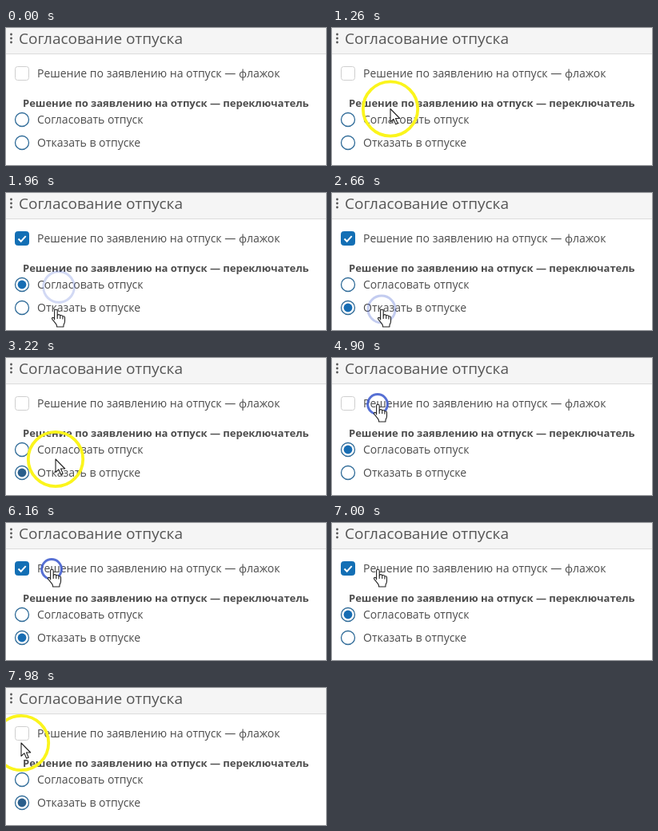
Recreate the animation shown at these times as an HTML page. Size 400x172 px, loop 8000 ms.

```html
<!DOCTYPE html>
<html lang="ru">
<head>
<meta charset="utf-8">
<title>Согласование отпуска</title>
<style>
  html, body { margin: 0; width: 100%; height: 100%; overflow: hidden; background: #fff; }
  svg { display: block; width: 400px; height: 172px; font: 14px "Open Sans", sans-serif; fill: #4c4c4c; }
  .title { font-size: 19px; fill: #555; }
  .group { font-size: 13px; font-weight: 700; }
  .radio { fill: #fff; stroke: #2f6b98; stroke-width: 1.3; }
  .pointer { fill: #fff; stroke: #222; stroke-width: 1.1; stroke-linejoin: round; }
</style>
</head>
<body>
<svg viewBox="0 0 400 172">
  <rect width="400" height="32" fill="#f5f5f5"/>
  <rect y="32" width="400" height="1" fill="#dcdcdc"/>
  <g fill="#555">
    <circle cx="6.5" cy="8" r="1.4"/><circle cx="6.5" cy="13" r="1.4"/><circle cx="6.5" cy="18" r="1.4"/>
  </g>
  <text class="title" x="16" y="20">Согласование отпуска</text>

  <rect id="box" x="11.5" y="48.5" width="17" height="17" rx="3" stroke-width="1"/>
  <path id="tick" d="M15.5 57.5l3.2 3.2 6-6.6" fill="none" stroke="#fff" stroke-width="2"/>
  <text x="39" y="62">Решение по заявлению на отпуск — флажок</text>

  <text class="group" x="21" y="99">Решение по заявлению на отпуск — переключатель</text>
  <circle class="radio" cx="20" cy="115" r="8.5"/>
  <circle class="radio" cx="20" cy="144" r="8.5"/>
  <circle id="dot" cx="20" r="5.4"/>
  <text x="39" y="120">Согласовать отпуск</text>
  <text x="39" y="149">Отказать в отпуске</text>

  <circle id="ripple" fill="none" stroke="#4560cf" stroke-width="3"/>
  <g id="cursor">
    <circle id="halo" r="34.2" fill="none" stroke="#fbf51c" stroke-width="3.8"/>
    <path id="arrow" class="pointer" d="M0 0V16.5l3.9-3.6 2.7 6.4 2.6-1.1-2.7-6.2h5.2z"/>
    <g id="hand" class="pointer" transform="translate(-5 0)">
      <path d="M3.6 13V2a1.8 1.8 0 0 1 3.6 0V8q.4-1.5 1.8-1.4 1.6 0 1.7 1.7 .5-1 1.7-.8 1.4.2 1.5 1.7 .5-.7 1.4-.4 1.2.3 1.2 1.8V15q0 2-1.1 3.6 -.5.9-.5 3.4H6.6q0-2.2-1.1-3.7L.9 12.6q-.9-1.4.2-2.1 1-.6 2.5 1.2z"/>
      <path d="M7.2 8v4M10.7 8.5V12M13.9 9.5V12.5" fill="none"/>
    </g>
  </g>
</svg>
<script>
  const LOOP = 8000, STEP = 140, LAG = 3 * STEP;
  const $ = id => document.getElementById(id);
  const set = (id, attrs) => {
    for (const k in attrs) $(id).setAttribute(k, attrs[k]);
  };
  const show = (id, on) => set(id, { visibility: on ? 'visible' : 'hidden' });

  // time, x, y
  const path = [
    [1120, 80, 85], [1400, 66, 118], [1820, 66, 118], [1960, 62, 146],
    [3080, 62, 146], [3220, 62, 127], [3360, 62, 122], [3780, 62, 122],
    [4060, 79, 40], [4340, 41, 44], [4620, 57, 58], [7840, 57, 58], [7980, 19, 69]
  ];

  // The clicked control changes at once, the linked one follows after LAG
  const clicks = [
    { at: 1540, x: 66, y: 118, control: 'radio', yes: true },
    { at: 2380, x: 62, y: 146, control: 'radio', yes: false },
    { at: 3780, x: 62, y: 122, control: 'radio', yes: true },
    { at: 4900, x: 57, y: 58, control: 'check', yes: false },
    { at: 6160, x: 57, y: 58, control: 'check', yes: true },
    { at: 7280, x: 57, y: 58, control: 'check', yes: false }
  ];
  const fade = [0.9, 0.65, 0.32, 0.24];
  const rows = [56, 115, 144];

  function place(t) {
    if (t < path[0][0]) return null;
    const i = path.findIndex(p => p[0] >= t);
    if (i < 0) return path[path.length - 1].slice(1);
    if (i === 0) return path[0].slice(1);
    const a = path[i - 1], b = path[i], k = (t - a[0]) / (b[0] - a[0]);
    return [a[1] + (b[1] - a[1]) * k, a[2] + (b[2] - a[2]) * k];
  }

  function valueOf(control, t) {
    let value = null;
    for (const c of clicks)
      if (t >= c.at + (c.control === control ? 0 : LAG)) value = c.yes;
    return value;
  }

  function draw(now) {
    const t = Math.floor((now % LOOP) / STEP) * STEP;

    const pos = place(t);
    const hand = !!pos && rows.some(y => Math.abs(pos[1] - y) <= 10);
    const arrow = !!pos && !hand;
    if (pos) set('cursor', { transform: `translate(${pos})` });
    show('hand', hand);
    show('arrow', arrow);
    show('halo', arrow);

    const checked = valueOf('check', t) === true;
    set('box', { fill: checked ? '#136fb5' : '#fff', stroke: checked ? '#136fb5' : '#cfcfcf' });
    show('tick', checked);

    const choice = valueOf('radio', t);
    show('dot', choice !== null);
    set('dot', { cy: choice ? 115 : 144, fill: arrow ? '#2b5f8c' : '#176db3' });

    const click = clicks.find(c => t >= c.at && t < c.at + fade.length * STEP);
    show('ripple', !!click);
    if (click) {
      const age = (t - click.at) / STEP;
      set('ripple', { cx: click.x, cy: click.y, r: 12.4 + 2.3 * age, opacity: fade[age] });
    }
  }

  const start = performance.now();
  function tick() {
    draw(performance.now() - start);
    requestAnimationFrame(tick);
  }
  tick();
</script>
</body>
</html>
```
